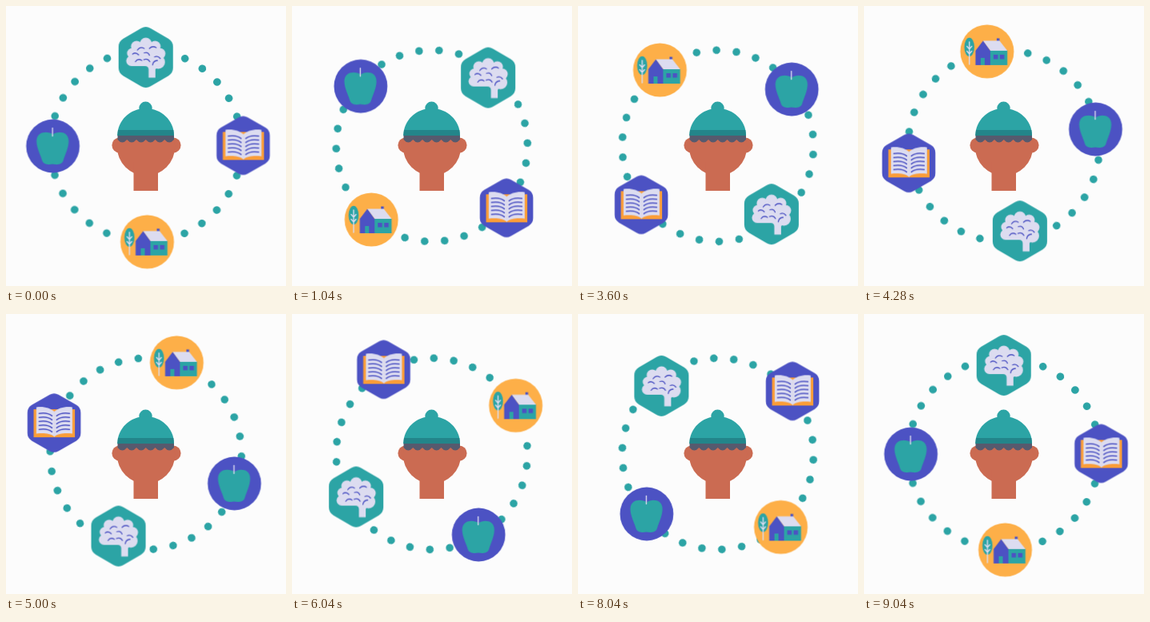
Animation, 350 px wide and 350 px high, one loop 9.08 s. Source, as an HTML page:

```html
<!DOCTYPE html>
<html lang="en">
<head>
<meta charset="utf-8">
<title>Orbiting icons</title>
<style>
  :root {
    --teal: #2ca4a5;
    --blue: #4c52c3;
    --orange: #fdaf48;
    --cover: #fb9d38;
    --pale: #dcdcf0;
    --skin: #cb6b52;
  }
  html, body { margin: 0; width: 100%; height: 100%; overflow: hidden; background: #fcfcfc; }
  svg { display: block; width: 100%; height: 100%; }

  .teal { fill: var(--teal); }
  .blue { fill: var(--blue); }
  .orange { fill: var(--orange); }
  .cover { fill: var(--cover); }
  .pale { fill: var(--pale); }
  .skin { fill: var(--skin); }
  .ink { fill: none; stroke: var(--blue); stroke-width: 1.6; stroke-linecap: round; }
  .fold { fill: none; stroke: var(--blue); stroke-width: 1.3; stroke-linecap: round; }
  .chalk { fill: none; stroke: var(--pale); stroke-width: 1.4; stroke-linecap: round; }
  .hex { stroke-linejoin: round; }
  .hex.teal { stroke: var(--teal); stroke-width: 23.5; }
  .hex.blue { stroke: var(--blue); stroke-width: 22; }
  .dots { fill: none; stroke: var(--teal); stroke-width: 9.6; stroke-linecap: round; stroke-dasharray: .001 .999; }

  /* Steps of 40 ms after a 40 ms rest; the ring finishes its turn one step before the icons. */
  .spin { animation: turn 9080ms -3ms infinite; }
  .upright { animation: unturn 9080ms -3ms infinite; }
  .ring { animation: ring 9080ms -3ms infinite; }
  @keyframes turn {
    0% { transform: rotate(0deg); }
    0.44053% { transform: rotate(0deg); animation-timing-function: steps(225, end); }
    99.55947%, 100% { transform: rotate(360deg); }
  }
  @keyframes unturn {
    0% { transform: rotate(0deg); }
    0.44053% { transform: rotate(0deg); animation-timing-function: steps(225, end); }
    99.55947%, 100% { transform: rotate(-360deg); }
  }
  @keyframes ring {
    0% { transform: rotate(0deg); }
    0.44053% { transform: rotate(0deg); animation-timing-function: steps(224, end); }
    99.11894%, 100% { transform: rotate(360deg); }
  }
</style>
</head>
<body>
<svg viewBox="0 0 350 350">
  <defs>
    <g id="page">
      <path class="pale" d="M.2-14C-5-18.500-14-21-22.500-19.500V13.500C-14 12.500-5 13 .2 17.500Z"/>
      <path id="line" class="ink" d="M-19-11.800Q-9-13.500-3-8.800"/>
      <use href="#line" y="5"/>
      <use href="#line" y="10"/>
      <use href="#line" y="15"/>
      <use href="#line" y="20"/>
    </g>
  </defs>

  <!-- Head -->
  <g class="skin">
    <circle cx="142" cy="174" r="9.6"/>
    <circle cx="209" cy="174" r="9.6"/>
    <circle cx="175" cy="176" r="36.2"/>
    <rect x="159.5" y="195" width="30.5" height="36"/>
  </g>
  <path fill="#565a6e" d="M139.500 161H210V167q-5.900 7-11.750 0q-5.900 7-11.750 0q-5.900 7-11.750 0q-5.900 7-11.750 0q-5.900 7-11.750 0q-5.900 7-11.750 0Z"/>
  <circle class="teal" cx="174.5" cy="127.8" r="8.2"/>
  <path class="teal" d="M139.300 162C139.300 143 155 128 174.600 128S210 143 210 162Z"/>
  <path fill="#23858a" d="M140 155H209.300L210 162H139.300Z"/>

  <!-- Ring of dots -->
  <g transform="translate(174.8 174.8)">
    <g class="ring"><circle class="dots" r="119.6" pathLength="30" transform="rotate(-89.85)"/></g>
  </g>

  <!-- House -->
  <g transform="translate(176 174.8)"><g class="spin"><g transform="translate(.5 120)"><g class="upright">
    <circle class="orange" r="33.5"/>
    <ellipse class="teal" cx="-22.2" cy="-5.5" rx="6.3" ry="11.8"/>
    <path class="chalk" d="M-22.200-12V16M-22.200-3l-3-3.500M-22.200-3l3-3.500M-22.200 3l-3-3.500M-22.200 3l3-3.500"/>
    <path class="blue" d="M-14.500-1L-5-13.500L4-1V17H-14.500Z"/>
    <path class="teal" d="M4-1.500H25.300V17H4ZM-8 8h5v9h-5Z"/>
    <path class="blue" d="M8 4h5.500v5.500H8ZM16 4h5.500v5.500H16ZM12-16.500h3.500V-13H12Z"/>
    <path class="pale" d="M-5-13.500H15.500L25.300-1H4.300Z"/>
  </g></g></g></g>

  <!-- Apple -->
  <g transform="translate(175 175.1)"><g class="spin"><g transform="translate(-116.4 0)"><g class="upright">
    <circle class="blue" r="33.4"/>
    <path class="teal" d="M0-14.500C-5-18.500-20.500-19.500-20.500-6C-20.500 2-15.500 11-13.500 18C-12 23.500-4 23.500-.5 22.500C4 23.500 11.500 23.500 13 18C15 11 19.700 2 19.700-6C19.700-19.500 5-18.500 0-14.500Z"/>
    <path class="chalk" d="M-.5-22.500V-12.500"/>
  </g></g></g></g>

  <!-- Book -->
  <g transform="translate(175.2 174.4)"><g class="spin"><g transform="translate(121.3 0)"><g class="upright">
    <path class="hex blue" d="M0-25.750L22.300-12.870V12.870L0 25.750L-22.300 12.870V-12.870Z"/>
    <rect class="cover" x="-25.5" y="-17" width="51.5" height="35"/>
    <g transform="translate(.3 0)">
      <use href="#page"/>
      <use href="#page" transform="scale(-1 1)"/>
    </g>
  </g></g></g></g>

  <!-- Brain -->
  <g transform="translate(174.9 173.6)"><g class="spin"><g transform="translate(-.2 -109.5)"><g class="upright">
    <path class="hex teal" d="M0-26L22.300-13V13L0 26L-22.300 13V-13Z"/>
    <g class="pale">
      <circle cy="-17" r="7.5"/>
      <circle cx="-11.5" cy="-13.5" r="7"/>
      <circle cx="11.5" cy="-13.5" r="7"/>
      <circle cx="-17" cy="-5" r="6.5"/>
      <circle cx="17.5" cy="-4.5" r="7"/>
      <circle cx="-18" cy="4.5" r="6.5"/>
      <circle cx="15.5" cy="6" r="8.5"/>
      <path d="M-17-8L0-18L17-8V10L12 15V25.500H3.500V15.500Q3.500 11-1 11H-18Z"/>
    </g>
    <path class="fold" d="M-10.500-9q3.500-5 8.500-2M4.500-11q4-4 8.500-1M-16.500-4q4-3 7.500 1M-2-5.500q5-1.500 6.500 3M-13 5.500q3-4.500 8-1.500M-2.500 3q5-2 7.500 2.500M8.500 9.500q.5-5 6-5.500M11-.5q4-2 7 2"/>
  </g></g></g></g>
</svg>
</body>
</html>
```
